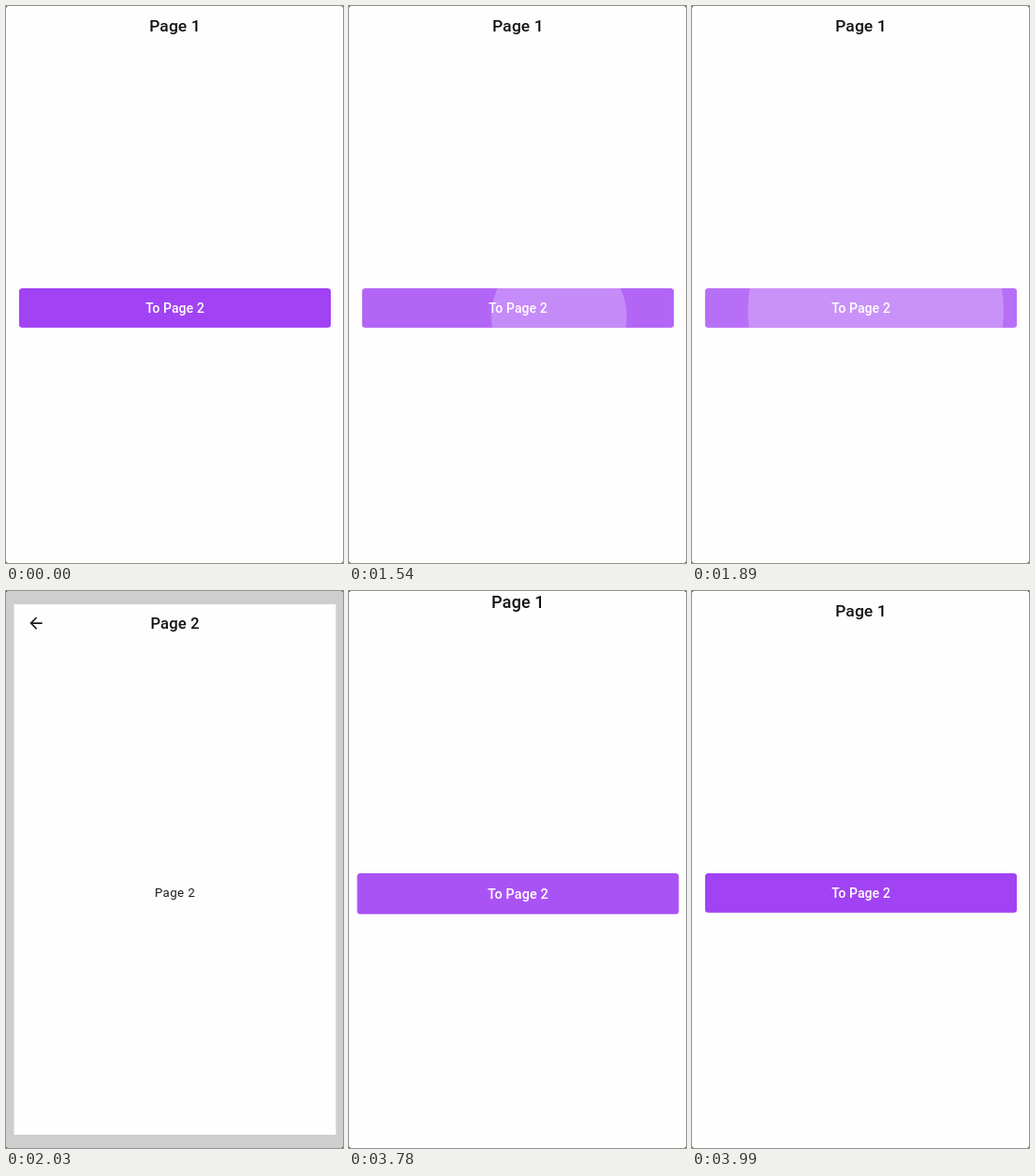
An HTML page for the animation above (4620 ms loop, 358x590 px).

```html
<!DOCTYPE html>
<html lang="en">
<head>
<meta charset="utf-8">
<title>Page transition</title>
<style>
  html, body { margin: 0; width: 100%; height: 100%; overflow: hidden; background: #000; }
  svg { display: block; width: 358px; height: 590px; }
  text { font-family: Roboto, "Noto Sans", sans-serif; text-anchor: middle; fill: #1b1b1b; }
  .title { font-size: 17.4px; font-weight: 500; letter-spacing: .13px; fill: #141414; }
  .label { font-size: 13.92px; font-weight: 500; letter-spacing: .09px; fill: #fff; }
  .body { font-size: 13.92px; letter-spacing: .42px; }
</style>
</head>
<body>
<svg viewBox="0 0 358 590">
  <defs>
    <clipPath id="screen"><rect width="358" height="590" rx="2"/></clipPath>
    <clipPath id="buttonClip"><rect x="13.9" y="298.9" width="331.2" height="41.9" rx="3.5"/></clipPath>
  </defs>
  <g clip-path="url(#screen)">
    <rect width="358" height="590" fill="#fefefe"/>
    <g id="page1">
      <text class="title" x="179.5" y="27">Page 1</text>
      <rect x="13.9" y="298.9" width="331.2" height="41.9" rx="3.5" fill="#a142f4"/>
      <g clip-path="url(#buttonClip)" fill="#fff">
        <rect id="highlight" x="13" y="298" width="333" height="44"/>
        <circle id="ripple"/>
      </g>
      <text class="label" x="179.5" y="325">To Page 2</text>
    </g>
    <rect id="scrim" width="358" height="590"/>
    <g id="page2">
      <rect width="359" height="590" fill="#fefefe"/>
      <path transform="translate(14.06 10.56) scale(.87)" fill="#1b1b1b"
        d="M20 11H7.83l5.59-5.59L12 4l-8 8 8 8 1.41-1.41L7.83 13H20v-2z"/>
      <text class="title" x="179.5" y="27">Page 2</text>
      <text class="body" x="179.5" y="325">Page 2</text>
    </g>
  </g>
</svg>
<script>
const LOOP = 4620, STEP = 70;
const PRESS = 1470, PUSH = 2030, POP = 3780;
const TRANSITION = 300, LEAD = 82;

const el = id => document.getElementById(id);
const page1 = el('page1'), page2 = el('page2'), scrim = el('scrim');
const highlight = el('highlight'), ripple = el('ripple');

const clamp = v => Math.min(1, Math.max(0, v));
const mix = (a, b, k) => a + (b - a) * k;
const interval = (t, a, b) => clamp((t - a) / (b - a));

function cubic(x1, y1, x2, y2) {
  const at = (a, b, s) => 3 * a * s * (1 - s) ** 2 + 3 * b * s * s * (1 - s) + s ** 3;
  return x => {
    let lo = 0, hi = 1;
    for (let i = 0; i < 24; i++) {
      const mid = (lo + hi) / 2;
      if (at(x1, x2, mid) < x) lo = mid; else hi = mid;
    }
    return at(y1, y2, (lo + hi) / 2);
  };
}

const ease = cubic(.25, .1, .25, 1);
const zoomStart = cubic(.05, 0, .133333, .06);
const zoomEnd = cubic(.208333, .82, .25, 1);

// Fast start, very slow finish
function zoomCurve(t) {
  if (t >= .97) return 1;
  return t < 1 / 6 ? .4 * zoomStart(t * 6) : .4 + .6 * zoomEnd((t - 1 / 6) * 1.2);
}

const progress = (t, start) => clamp((t - start + LEAD) / TRANSITION);

function setScale(node, s) {
  node.setAttribute('transform', `translate(179.5 295) scale(${s}) translate(-179.5 -295)`);
}

function drawPress(t) {
  const n = Math.min(6, (t - PRESS) / STEP);
  const k = ease(n < 1 ? mix(.066, .147, n) : .147 + .0536 * (n - 1));
  ripple.setAttribute('cx', mix(232.6, 179.5, k));
  ripple.setAttribute('cy', mix(331, 320, k));
  ripple.setAttribute('r', mix(50, 172, k));
  ripple.setAttribute('opacity', Math.min(.24, .19 + .05 * n));
  highlight.setAttribute('opacity', Math.min(.24, .09 + .1 * n));
}

function draw(t) {
  const pressed = t >= PRESS && t < PUSH;
  const onPage2 = t >= PUSH && t < POP;

  page1.style.display = onPage2 ? 'none' : '';
  page2.style.display = scrim.style.display = onPage2 ? '' : 'none';
  ripple.style.display = pressed ? '' : 'none';
  highlight.setAttribute('opacity', 0);
  setScale(page1, 1);

  if (pressed) {
    drawPress(t);
  } else if (onPage2) {
    const p = progress(t, PUSH);
    setScale(page2, mix(.85, 1, zoomCurve(p)));
    scrim.setAttribute('opacity', .6 * interval(p, .2075, .4175));
  } else if (t >= POP) {
    setScale(page1, mix(1.1, 1, zoomCurve(progress(t, POP))));
    highlight.setAttribute('opacity', Math.max(0, .09 - .24 * (t - POP) / 200));
  }
}

const begin = performance.now();
function tick() {
  const t = (performance.now() - begin) % LOOP;
  draw(Math.floor(t / STEP) * STEP);
  requestAnimationFrame(tick);
}
tick();
</script>
</body>
</html>
```
